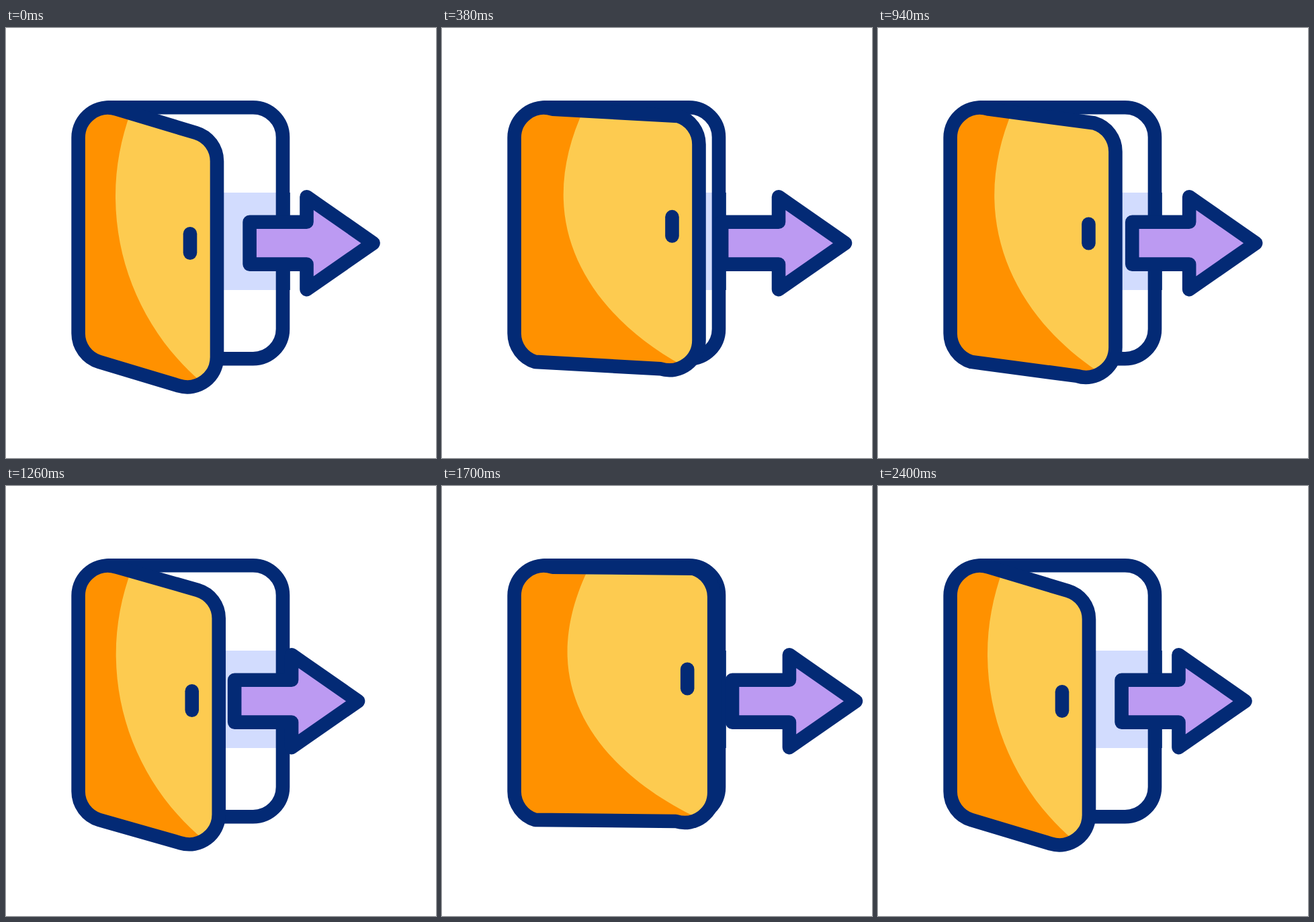
An HTML page for the animation above (2.82 s loop, 640 by 640 pixels).

```html
<!DOCTYPE html>
<html lang="en">
<head>
<meta charset="utf-8">
<title>Exit door</title>
<style>
  html, body { margin: 0; width: 100%; height: 100%; overflow: hidden; background: #fff; }
  svg { display: block; width: 100%; height: 100%; }
  .line { fill: none; stroke: #032a75; stroke-width: 20.6; stroke-linecap: round; stroke-linejoin: round; }
</style>
</head>
<body>
<svg viewBox="0 0 640 640" xmlns="http://www.w3.org/2000/svg">
  <defs><clipPath id="clip"><path id="clipDoor"/></clipPath></defs>
  <path d="M300 245H412V390H300Z" fill="#d2dcfe"/>
  <path class="line" d="M152 118.3H367.7A44.3 44.3 0 0 1 412 162.6V448A44.3 44.3 0 0 1 367.7 492.3H300"/>
  <path d="M402 245H422.8V390H402Z" fill="#032a75"/>
  <path id="arrow" class="line" style="fill:#bc9af2"
    d="M362.6 288.8H447.5V251.3L546.5 320.2L447.5 389.1V351.6H362.6Z"/>
  <g clip-path="url(#clip)">
    <path d="M90 90H430V560H90Z" fill="#ff9100"/>
    <path id="light" fill="#fdcb50"/>
  </g>
  <path id="door" class="line"/>
  <path id="handle" class="line" d="M274 306.2V334.6"/>
</svg>
<script>
  const LOOP = 2820, SWING = 600, STEP = 20;
  const SHUT = [98.5, -36];           // travel of the door's free edge
  const REST = 0, OUT = 77, BACK = -25.3;
  const arrowStops = [REST, OUT, BACK, OUT, REST];
  const doorStops = [0, 1, 0, 1, 0];

  const el = id => document.getElementById(id);
  const ease = p => p * p * (3 - 2 * p);

  function track(stops, t) {
    const i = Math.min(Math.floor(t / SWING), stops.length - 2);
    const p = Math.min((t - i * SWING) / SWING, 1);
    return stops[i] + (stops[i + 1] - stops[i]) * ease(p);
  }

  function doorPath(s) {
    const r = (x, y) => `${x + SHUT[0] * s} ${y + SHUT[1] * s} `;
    return 'M107.6 163.2C107.6 133.4 136.2 111.7 164.8 120.6L' + r(282.6, 156) +
      'C' + r(301.3, 161.6) + r(314, 178.9) + r(314, 198.3) +
      'L' + r(314, 489.7) +
      'C' + r(314, 519.5) + r(285.4, 541.2) + r(256.8, 532.3) +
      'L138.6 496.9C120.3 491.3 107.6 474 107.6 454.6Z';
  }

  function lightPath(s) {
    const m = (x, y, dx, dy) => `${x + dx * s} ${y + dy * s} `;
    return 'M' + m(186, 124, 37, -6) +
      'C' + m(171.1, 164.3, 30, -4) + m(163, 207, 25.5, -3) + m(163, 250, 25.5, -3) +
      'C' + m(163, 356.7, 25.5, -6) + m(209.8, 458, 58.2, -21.3) + m(291, 527.2, 97, -35.5) +
      'L' + m(340, 569, 97, -35.5) + 'L460 560V90H' + (198 + 40 * s) + 'Z';
  }

  function draw(t) {
    const s = track(doorStops, t);
    const d = doorPath(s);
    el('door').setAttribute('d', d);
    el('clipDoor').setAttribute('d', d);
    el('light').setAttribute('d', lightPath(s));
    el('handle').setAttribute('transform', `translate(${SHUT[0] * s} ${SHUT[1] * s})`);
    el('arrow').setAttribute('transform', `translate(${track(arrowStops, t)} 0)`);
  }

  let start;
  function tick(now) {
    start ??= now;
    const t = (now - start) % LOOP;
    draw(Math.floor(t / STEP + 1e-6) * STEP);
    requestAnimationFrame(tick);
  }
  draw(0);
  requestAnimationFrame(tick);
</script>
</body>
</html>
```
